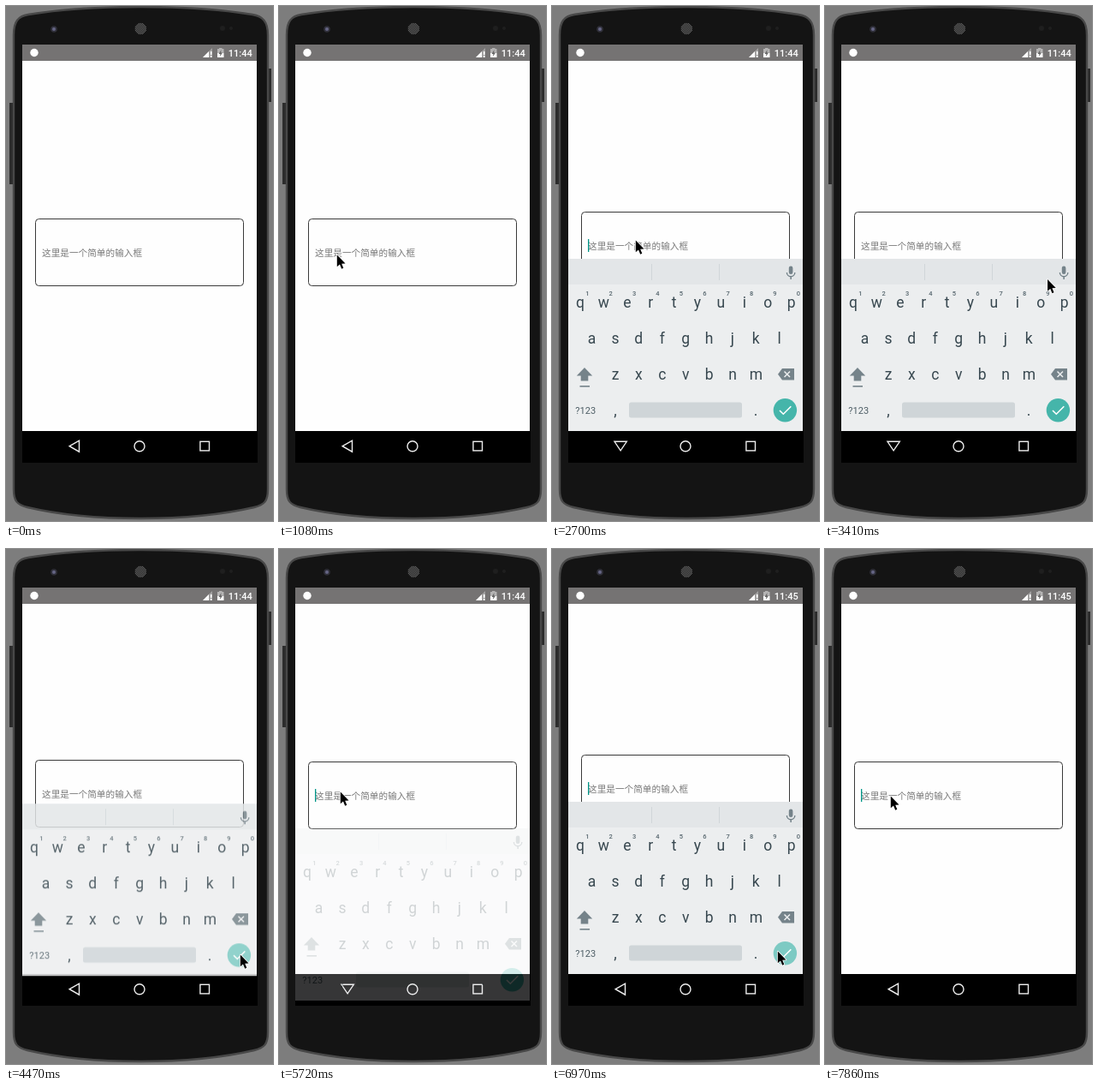
Recreate the animation shown at these times as an HTML page with a canvas. Size 312 px wide and 601 px high, loop 8000 ms.

```html
<!DOCTYPE html>
<html lang="zh">
<head>
<meta charset="utf-8">
<title>Input demo</title>
<style>
html, body { margin: 0; width: 100%; height: 100%; overflow: hidden; background: #7d7d7d; }
canvas { display: block; width: 312px; height: 601px; }
</style>
</head>
<body>
<canvas id="stage" width="312" height="601"></canvas>
<script>
const stage = document.getElementById('stage');
const sheet = document.createElement('canvas');
sheet.width = stage.width;
sheet.height = stage.height;
let c = stage.getContext('2d');

const LOOP = 8000, STEP = 178.6;
const ROBOTO = 'Roboto, "Noto Sans", sans-serif';
const CJK = '"Noto Sans CJK SC", "Noto Sans CJK", sans-serif';
const INK = '#37474f', SOFT = '#75838a', PANEL = '#eceeef';

// Pointer strokes: start and end time, then where each one leads.
const MOVES = [
  { from: 340, to: 1000, x: 67, y: 290 },
  { from: 1750, to: 2300, x: 97, y: 273 },
  { from: 2780, to: 3400, x: 261, y: 319 },
  { from: 3400, to: 4080, x: 273, y: 473 },
  { from: 4640, to: 5340, x: 71, y: 283 },
  { from: 5890, to: 6780, x: 263, y: 469 },
  { from: 7140, to: 7670, x: 76, y: 288 }
];
const TAPS = [ // keyboard opens, check is pressed, keyboard closes
  { open: 2480, press: 4280, close: 4430 },
  { open: 5700, press: 6940, close: 7020 }
];

const clamp = v => Math.max(0, Math.min(1, v));
const mix = (a, b, f) => a + (b - a) * f;
const within = (v, a, b) => v >= a && v < b;

function paint(fill, stroke, width = 1) {
  if (fill) { c.fillStyle = fill; c.fill(); }
  if (stroke) { c.strokeStyle = stroke; c.lineWidth = width; c.stroke(); }
}

function rect(x, y, w, h, fill) {
  c.fillStyle = fill;
  c.fillRect(x, y, w, h);
}

function round(x, y, w, h, r, fill, stroke) {
  c.beginPath();
  c.roundRect(x, y, w, h, r);
  paint(fill, stroke);
}

function disc(x, y, r, fill, stroke, width) {
  c.beginPath();
  c.arc(x, y, r, 0, 7);
  paint(fill, stroke, width);
}

function path(d, fill, stroke, width = 1) {
  const p = new Path2D(d);
  if (fill) { c.fillStyle = fill; c.fill(p); }
  if (stroke) { c.strokeStyle = stroke; c.lineWidth = width; c.stroke(p); }
}

function text(s, x, y, font, fill, align = 'center') {
  c.font = font;
  c.fillStyle = fill;
  c.textAlign = align;
  c.fillText(s, x, y);
}

function keyRow(s, x, y, font = '17.5px ' + ROBOTO, fill = INK) {
  [...s].forEach((ch, i) => text(ch, x + 27.4 * i, y, font, fill));
}

function phone() {
  rect(0, 0, 312, 601, '#7d7d7d');
  rect(4, 113, 4, 95, '#2c2c2c');
  rect(307, 73, 3, 39, '#2c2c2c');
  path('M9 34 C9 18 14 12 26 10 Q80 1 157 1 T288 10 C300 12 306 18 306 34 ' +
    'V564 C306 578 302 582 290 585 Q234 598 157 598 T25 585 C13 582 9 578 9 564 Z',
    '#141414', '#484848', 2.4);
  disc(56, 27, 3.8, '#30303a');
  disc(56, 27, 2, '#666685');
  disc(157, 26.5, 7, '#222');
  for (let y = -6; y <= 6; y++)
    for (let x = -6; x <= 6; x++)
      if ((x + y) % 2 === 0 && x * x + y * y < 46) rect(157 + x, 26 + y, 1, 1, '#606060');
  disc(253, 26, 3, '#1f1f1f');
  disc(263, 26, 2, '#1f1f1f');
}

function statusBar(clock) {
  rect(19, 45, 274, 19, '#757373');
  disc(33, 54.5, 4.7, '#fff');
  path('M230 60 L241 49 V60 Z', '#a3a2a2');
  path('M230 60 L237 53 V60 Z', '#fff');
  rect(239, 53, 1.5, 4, '#fff');
  rect(239, 58, 1.5, 2, '#fff');
  rect(249, 49, 3.5, 2, '#b5b4b4');
  rect(247, 50, 7.5, 5, '#b5b4b4');
  rect(247, 55, 7.5, 5, '#fff');
  path('M251.5 51 L248.5 56 H250.4 L250 59 L253 54.5 H251.2 Z', '#666');
  text(clock, 273.7, 59, '500 11px ' + ROBOTO, '#fff');
}

function field(pan, caret) {
  c.save();
  c.translate(0, -pan);
  round(34.5, 248.5, 243, 78, 4, null, '#3a3a3a');
  text('这里是一个简单的输入框', 42, 292, '10.65px ' + CJK, '#787878', 'left');
  if (caret) rect(42, 280, 1.3, 15, '#009688');
  c.restore();
}

function navBar(down) {
  rect(19, 496, 275, 37, '#000');
  path(down ? 'M73 508.3 H87.3 L80.1 518.8 Z' : 'M74.2 513.7 L85.5 507.2 V520.2 Z',
    null, '#eee', 1.4);
  disc(156, 513.7, 6, null, '#eee', 1.4);
  c.strokeRect(226.9, 508.3, 10.6, 10.6);
}

function mic() {
  round(276.8, 303.5, 4.6, 9.5, 2.3, SOFT);
  c.beginPath();
  c.arc(279.1, 311, 4.7, 0, Math.PI);
  paint(null, SOFT, 1.4);
  rect(278.4, 315.5, 1.5, 3.5, SOFT);
}

function keys(pressed) {
  rect(19, 295, 274, 201, PANEL);
  rect(19, 295, 274, 30, '#e3e6e8');
  rect(116, 301, 1, 19, '#d0d6d9');
  rect(195, 301, 1, 19, '#d0d6d9');
  mic();
  keyRow('1234567890', 41.3, 337.5, '500 7.5px ' + ROBOTO, '#55656d');
  keyRow('qwertyuiop', 33, 352);
  keyRow('asdfghjkl', 46.5, 394);
  keyRow('zxcvbnm', 74, 436);
  path('M38 422 L47.2 431.5 H42.3 V437.5 H33.7 V431.5 H28.8 Z', SOFT);
  rect(32.5, 443, 11.5, 1.6, SOFT);
  path('M264 429.7 L269 423 H283 V436.5 H269 Z', SOFT);
  path('M271.5 426.5 L278 433 M278 426.5 L271.5 433', null, PANEL, 1.5);
  text('?123', 39.2, 475.5, '11px ' + ROBOTO, '#4d5d65');
  keyRow(',', 74, 477.5);
  keyRow('.', 238, 477.5);
  round(90, 462.5, 132, 18, 2.5, '#cfd5d8');
  disc(272.4, 471.7, 13.7, pressed ? '#7dcac3' : '#45b5aa');
  path('M266 472 L270.3 476.2 L279.3 467.2', null, '#fff', 1.6);
}

// Keys are blended as one sheet so the field shows through evenly.
function keyboard({ alpha, shift }, pressed) {
  const main = c;
  c = sheet.getContext('2d');
  keys(pressed);
  c = main;
  c.globalAlpha = alpha;
  c.drawImage(sheet, 0, shift);
  c.globalAlpha = 1;
}

function pointer(t) {
  if (t < MOVES[0].from) return;
  let x = 27, y = 377;
  for (const m of MOVES) {
    const f = clamp((t - m.from) / (m.to - m.from));
    x = mix(x, m.x, f);
    y = mix(y, m.y, f);
  }
  c.save();
  c.translate(x + .8, y + .5);
  c.lineJoin = 'round';
  const arrow = 'M0 0 V13.8 L3.2 11 L5.4 16.2 L7.5 15.3 L5.4 10.3 L9.7 10 Z';
  path(arrow, null, '#fff', 1.6);
  path(arrow, '#000');
  c.restore();
}

// The caret blinks twice a second and starts afresh on each tap.
function caretOn(t) {
  const start = t < 2600 ? -700 : t < 5700 ? 2600 : 5700;
  return (t - start) % 1000 < 500;
}

function keyboardState(t, { open, close }) {
  const shown = t < open ? 0 : clamp((t - open + 30) / 200);
  const gone = clamp((t - close) / 220);
  const alpha = shown * (1 - gone);
  return {
    alpha,
    shift: 40 * (1 - shown) + 14 * gone,
    pan: Math.round(8 * (gone ? Math.max(0, 1 - 5 * gone) : shown * shown))
  };
}

function render(time) {
  const t = Math.floor((time + 10) / STEP) * STEP;
  const tap = TAPS[t < 5200 ? 0 : 1];
  const board = keyboardState(t, tap);
  phone();
  rect(19, 64, 274, 432, '#fefefe');
  statusBar(t < 6200 ? '11:44' : '11:45');
  field(board.pan, caretOn(t));
  navBar(within(t, tap.open, tap.press));
  if (board.alpha) keyboard(board, t >= tap.press);
  pointer(t);
}

function tick(now) {
  render(now % LOOP);
  requestAnimationFrame(tick);
}
requestAnimationFrame(tick);
</script>
</body>
</html>
```
